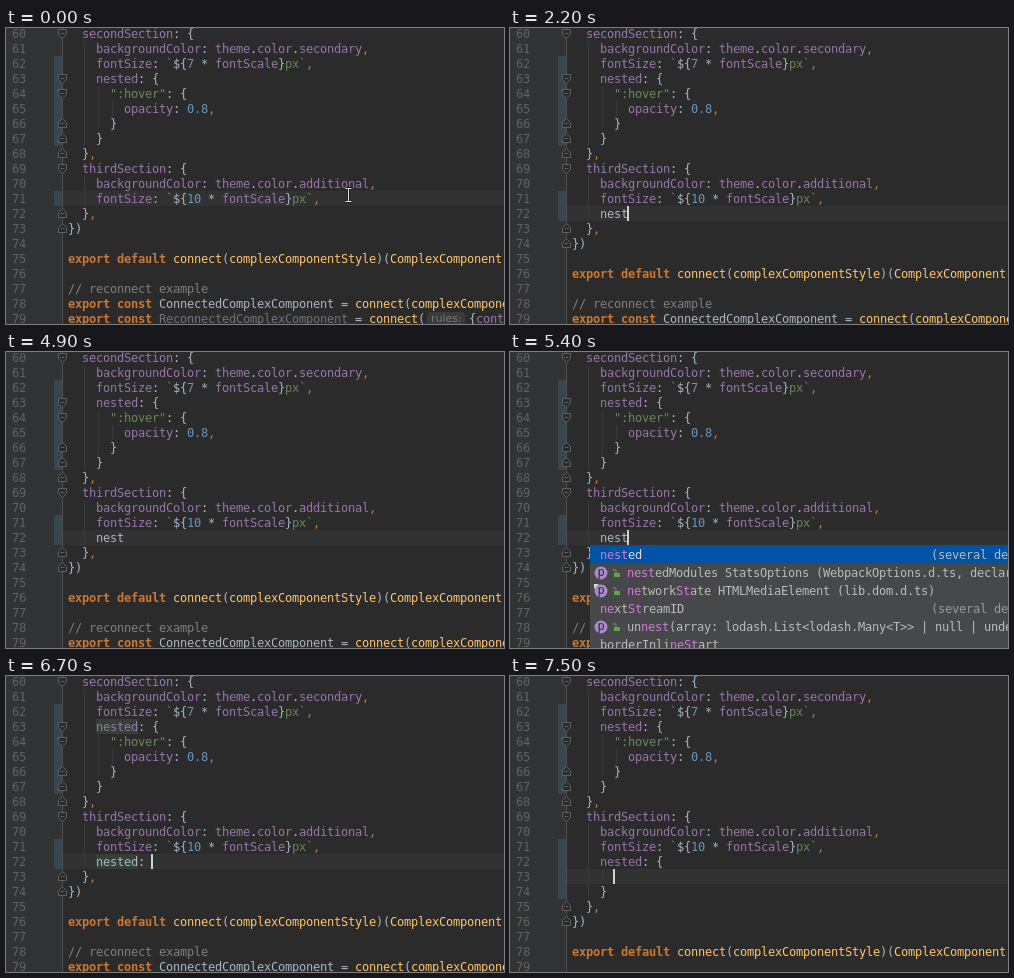
Recreate the animation shown at these times as an HTML page with a canvas. Size 498 by 296 pixels, loop 8000 ms.

```html
<!DOCTYPE html>
<html lang="en">
<head>
<meta charset="utf-8">
<title>Code editor</title>
<style>
  html, body { margin: 0; width: 100%; height: 100%; overflow: hidden; background: #2b2b2b; }
  canvas { display: block; }
</style>
</head>
<body>
<canvas id="stage" width="498" height="296"></canvas>
<script>
const ctx = document.getElementById('stage').getContext('2d', { alpha: false });
const W = 498, H = 296, LOOP = 8000;
const CELL = 7, LINE = 15, FIRST = 60, LEFT = 62;
const MONO = '12px "DejaVu Sans Mono", monospace';
const C = {
  back: '#2b2b2b', gutter: '#313335', number: '#606366', row: '#323232', text: '#a9b7c6',
  keyword: '#cc7832', string: '#6a8759', digit: '#6897bb', prop: '#9876aa', func: '#ffc66d',
  comment: '#808080', unused: '#72737a', bar: '#374752', fold: '#5e6060', guide: '#393b3b',
  usage: '#344134', caret: '#d0d0d0', popup: '#46484a', item: '#bbbbbb', match: '#d17ad6'
};

const head = `  secondSection: {
    backgroundColor: theme.color.secondary,
    fontSize: \`\${7 * fontScale}px\`,
    nested: {
      ":hover": {
        opacity: 0.8,
      }
    }
  },
  thirdSection: {
    backgroundColor: theme.color.additional,
    fontSize: \`\${10 * fontScale}px\`,`.split('\n');
const tail = `  },
})

export default connect(complexComponentStyle)(ComplexComponent

// reconnect example
export const ConnectedComplexComponent = connect(complexComponentStyle
export const ReconnectedComplexComponent = connect(`.split('\n');

const syntax = [
  [/^\/\/.*/, C.comment],
  [/^(export|default|const)\b/, C.keyword, true],
  [/^("[^"]*"|`|px\b)/, C.string],
  [/^\d[\d.]*/, C.digit],
  [/^,/, C.keyword],
  [/^(connect\b|[cC]omplexComponent\w*)/, C.func],
  [/^Reconnected\w+/, C.unused],
  [/^Connected\w+/, C.text],
  [/^[a-zA-Z]\w*/, C.prop],
  [/^[^\w"`,\/]+/, C.text]
];

const typed = [
  [600, ''], [1500, 'n'], [1800, 'ne'], [2000, 'nes'], [2200, 'nest'], [5700, 'nested'],
  [6600, 'nested:'], [6700, 'nested: '], [7100, 'nested: {}']
];

// Completion rows: parts alternate between plain and matched text.
const members = [
  { parts: ['', 'nest', 'ed'], note: '(several de' },
  { parts: ['', 'nest', 'edModules StatsOptions (WebpackOptions.d.ts, declaration)'], icon: true },
  { parts: ['', 'ne', 'twork', 'St', 'ate HTMLMediaElement (lib.dom.d.ts)'], icon: true, pin: true },
  { parts: ['', 'ne', 'xt', 'St', 'reamID'], note: '(several de' },
  { parts: ['un', 'nest', '(array: lodash.List<lodash.Many<T>> | null | undefined)'], icon: true },
  { parts: ['borderInli', 'neSt', 'art'] }
];
const keywords = ['undefined', 'null', 'this', 'class', 'typeof', 'void'];

const within = (t, from, to) => t >= from && t < to;
const lineTop = n => (n - FIRST) * LINE - 2;
const colX = col => LEFT + col * CELL;

function rect(x, y, w, h, color) {
  ctx.fillStyle = color;
  ctx.fillRect(x, y, w, h);
}

// Sets text on the fixed character grid and returns the x after it.
function put(str, x, base, color, bold) {
  ctx.font = (bold ? 'bold ' : '') + MONO;
  ctx.fillStyle = color;
  for (const ch of str) {
    if (ch !== ' ' && x < W) ctx.fillText(ch, x, base);
    x += CELL;
  }
  return x;
}

function code(line, x, base) {
  while (line) {
    const [rule, color, bold] = syntax.find(([r]) => r.test(line));
    const token = line.match(rule)[0];
    x = put(token, x, base, color, bold);
    line = line.slice(token.length);
  }
  return x;
}

function foldMark(n, closing) {
  const mid = lineTop(n) + 7.5, d = closing ? -1 : 1;
  ctx.beginPath();
  [[-4, -4], [4, -4], [4, 1], [0, 5], [-4, 1]].forEach(([x, y]) => ctx.lineTo(56.5 + x, mid + d * y));
  ctx.closePath();
  ctx.moveTo(54.5, mid);
  ctx.lineTo(58.5, mid);
  ctx.fillStyle = C.back;
  ctx.fill();
  ctx.strokeStyle = C.fold;
  ctx.stroke();
}

function guide(col, from, to) {
  rect(colX(col) + 2, lineTop(from), 1, (to - from + 1) * LINE, C.guide);
}

function inlayHint(x, base) {
  ctx.beginPath();
  ctx.roundRect(x + 2, base - 11, 38, 14, 4);
  ctx.fillStyle = '#3b3b3b';
  ctx.fill();
  ctx.fillStyle = '#787878';
  ctx.font = '11px "DejaVu Sans", sans-serif';
  ctx.fillText('rules:', x + 6, base - 1);
  code('{content', x + 44, base);
}

function mouseBeam(x, y) {
  for (const [color, width] of [['#1c1c1c', 3], ['#e6e6e6', 1]]) {
    ctx.beginPath();
    ctx.moveTo(x - 3, y - 6.5);
    ctx.lineTo(x + 3, y - 6.5);
    ctx.moveTo(x, y - 6.5);
    ctx.lineTo(x, y + 6.5);
    ctx.moveTo(x - 3, y + 6.5);
    ctx.lineTo(x + 3, y + 6.5);
    ctx.strokeStyle = color;
    ctx.lineWidth = width;
    ctx.stroke();
  }
  ctx.lineWidth = 1;
}

function memberIcon(y, pin) {
  ctx.beginPath();
  ctx.arc(91, y + 9, 6.5, 0, 7);
  ctx.fillStyle = '#a98bc9';
  ctx.fill();
  put('p', 87.5, y + 12, '#33283f');
  if (pin) {
    ctx.beginPath();
    ctx.moveTo(84, y + 2);
    ctx.lineTo(89, y + 2);
    ctx.lineTo(84, y + 7);
    ctx.fillStyle = '#d5dbe0';
    ctx.fill();
  }
  rect(104, y + 9, 6, 4, '#62a545');
  ctx.beginPath();
  ctx.arc(104.5, y + 7, 1.5, Math.PI, 0);
  ctx.lineTo(106, y + 9);
  ctx.strokeStyle = '#62a545';
  ctx.stroke();
}

function memberPopup() {
  rect(80, 193, W, H, C.popup);
  members.forEach(({ parts, icon, pin, note }, i) => {
    const y = 194 + i * 18;
    if (i === 0) rect(80, y - 1, W, 19, '#0052a4');
    if (icon) memberIcon(y, pin);
    let x = icon ? 117 : 90;
    parts.forEach((part, k) => {
      x = put(part, x, y + 13, k % 2 ? C.match : i ? C.item : '#dddddd');
    });
    if (note) put(note, 421, y + 13, i ? '#999999' : C.item);
  });
}

function keywordPopup() {
  rect(136, 193, W, H, C.popup);
  rect(136, 193, W, 18, '#55585a');
  keywords.forEach((word, i) => put(word, 146, Math.round(206 + i * 17.6), C.item, true));
}

function draw(t) {
  const entry = typed.filter(([at]) => t >= at).pop();
  const block = t >= 7500;
  const added = block ? 3 : entry ? 1 : 0;
  const caretLine = block ? 73 : 71 + added;
  const lines = [...head, ...(block ? ['    nested: {', '', '    }'] : added ? [''] : []), ...tail];

  rect(0, 0, W, H, C.back);
  rect(0, 0, 57, H, C.gutter);
  rect(57, lineTop(caretLine), W, LINE, C.row);
  rect(48, lineTop(62), 8, 6 * LINE, C.bar);
  rect(48, lineTop(71), 8, (1 + (t >= 700 ? added : 0)) * LINE, C.bar);
  rect(56, 0, 1, H, '#505050');

  guide(2, 61, 67);
  guide(4, 64, 66);
  guide(6, 65, 65);
  guide(2, 70, 71 + added);
  if (block) guide(4, 73, 73);

  if (within(t, 6100, 7500)) rect(colX(4), lineTop(63), 6 * CELL, LINE, C.usage);
  if (within(t, 6600, 7500)) rect(colX(4), lineTop(72), 6 * CELL, LINE, C.usage);

  for (let n = FIRST; n < 80; n++) {
    const base = lineTop(n) + 12;
    put(String(n), 6, base, C.number);
    const end = code(lines[n - FIRST], LEFT, base);
    if (lines[n - FIRST].includes('Reconnected')) inlayHint(end, base);
  }
  if (entry && !block) put(entry[1], colX(4), lineTop(72) + 12, C.text);

  [60, 63, 64, 69].forEach(n => foldMark(n, false));
  [66, 67, 68, 72 + added, 73 + added].forEach(n => foldMark(n, true));

  const blinkOff = within(t, 3100, 3600) || within(t, 4900, 5400);
  if (entry && !blinkOff) {
    const col = block ? 6 : 4 + entry[1].replace('}', '').length;
    rect(colX(col) - 1, lineTop(caretLine), 2, LINE, C.caret);
  }
  if (!entry) mouseBeam(342.5, 167);

  // Each popup is translucent for its first 100 ms.
  ctx.globalAlpha = within(t, 5000, 5100) || within(t, 6900, 7000) ? 0.82 : 1;
  if (within(t, 5000, 5700)) memberPopup();
  if (within(t, 6900, 7100)) keywordPopup();
  ctx.globalAlpha = 1;
}

function tick() {
  draw(performance.now() % LOOP);
  requestAnimationFrame(tick);
}
tick();
</script>
</body>
</html>
```
